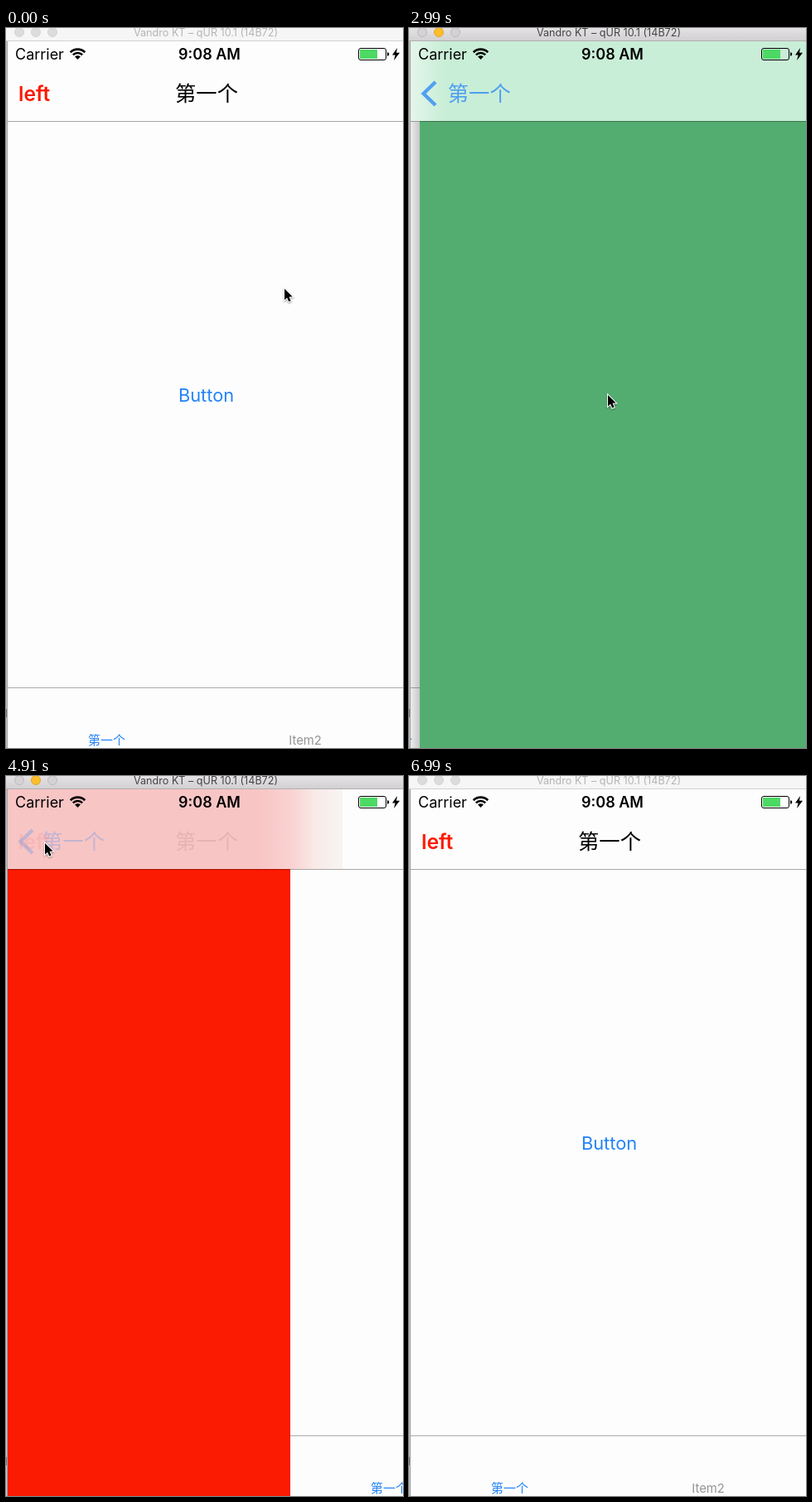
Recreate the animation shown at these times as an HTML page with a canvas. Size 479 by 867 pixels, loop 7.09 s.

```html
<!DOCTYPE html>
<html lang="zh">
<head>
<meta charset="utf-8">
<style>
html, body { margin: 0; width: 100%; height: 100%; overflow: hidden; background: #fdfdfd; }
canvas { display: block; }
</style>
</head>
<body>
<canvas id="stage" width="479" height="867"></canvas>
<script>
const c = document.getElementById('stage').getContext('2d');
const W = 479, H = 867, LEFT = 2, TOP = 16, NAV = 112, TAB = 794, SPAN = W - LEFT;
const LOOP = 7090;
const BLUE = '#2383f8', RED = '#fb1a02', GREEN = '#54ad70';
const LINE = 'rgba(0,0,0,.34)';
const NAME = '第一个';

// Start times of the four page changes
const PUSH_GREEN = 2691, POP_GREEN = 3735, PUSH_RED = 4815, POP_RED = 5698;

// Pointer path: time, x, y
const PATH = [
  [0, 336, 314], [300, 341, 305], [1802, 341, 305], [2540, 240, 442], [2990, 240, 442],
  [3600, 51, 78], [3890, 51, 78], [4170, 80, 97], [4330, 77, 95], [4620, 47, 81],
  [4920, 47, 81], [5660, 46, 82], [6100, 46, 82], [6550, 470, 190]
];

const lerp = (a, b, k) => a + (b - a) * k;
const settle = dt => {
  const p = dt < 0 ? 0 : 1 - Math.exp(-dt * 0.0127);
  return p > 0.998 ? 1 : p;
};
const fadeIn = dt => Math.max(0, Math.min(1, dt / 400));

function rect(x, y, w, h, fill) {
  c.fillStyle = fill;
  c.fillRect(x, y, w, h);
}

function text(str, x, y, size, fill, { weight = 400, align = 'left', alpha = 1 } = {}) {
  if (alpha <= 0) return;
  c.save();
  c.globalAlpha = alpha;
  c.font = `${weight} ${size}px Inter, "Noto Sans CJK SC", "Noto Sans CJK", sans-serif`;
  c.textAlign = align;
  c.fillStyle = fill;
  c.fillText(str, x, y);
  c.restore();
}

function poly(points, x = 0, y = 0) {
  c.beginPath();
  points.forEach(([px, py]) => c.lineTo(x + px, y + py));
}

function gradient(x0, y0, x1, y1, stops) {
  const g = c.createLinearGradient(x0, y0, x1, y1);
  stops.forEach(([at, color]) => g.addColorStop(at, color));
  return g;
}

function windowBar(active) {
  rect(0, 0, W, 15, active ? gradient(0, 0, 0, 15, [[0, '#e4e2e4'], [1, '#d2d0d2']]) : '#f6f6f6');
  rect(0, 15, W, 1, active ? '#b1afb1' : '#d3d3d3');
  [16, 36, 56].forEach((x, i) => {
    c.beginPath();
    c.arc(x, 5, 5.5, 0, 7);
    c.fillStyle = !active ? '#dcdcdc' : i === 1 ? '#fdbd2d' : '#d4d2d4';
    c.fill();
    c.lineWidth = 1;
    c.strokeStyle = !active ? '#d4d4d4' : i === 1 ? '#e5a62a' : '#bcbabc';
    c.stroke();
  });
  text('Vandro KT – qUR 10.1 (14B72)', 241, 10, 12.6, active ? '#454445' : '#b4b4b4', { align: 'center' });
  rect(0, TOP, 1, H, '#c4c4c4');
  rect(1, TOP, 1, H, '#a2a2a2');
  rect(0, 820, 1, 10, '#777');
}

function mainPage(dx, pressed) {
  const x = LEFT + dx;
  rect(x, TOP, SPAN, H, '#fdfdfd');
  text('Button', 241.5 + dx, 450, 21.8, BLUE, { align: 'center', alpha: pressed ? 0.22 : 1 });
  rect(x, TAB, SPAN, 1, '#ababab');
  text(NAME, 121.5 + dx, 863, 15, BLUE, { align: 'center' });
  text('Item2', 361 + dx, 863, 14.8, '#949494', { align: 'center' });
}

function chevron(alpha) {
  c.save();
  c.globalAlpha = alpha;
  c.strokeStyle = BLUE;
  c.lineWidth = 4.4;
  poly([[32, 65], [17.5, 79], [32, 93]]);
  c.stroke();
  c.restore();
}

function statusBar() {
  text('Carrier', 11, 38, 18, '#000');
  text('9:08 AM', 245.5, 38, 18, '#000', { weight: 600, align: 'center' });
  c.strokeStyle = c.fillStyle = '#000';
  const a = -Math.PI * 3 / 4, b = -Math.PI / 4;
  c.lineWidth = 2.6;
  [12.4, 8].forEach(r => {
    c.beginPath();
    c.arc(86.5, 38, r, a, b);
    c.stroke();
  });
  c.beginPath();
  c.moveTo(86.5, 38);
  c.arc(86.5, 38, 4.8, a, b);
  c.fill();

  c.lineWidth = 1;
  c.beginPath();
  c.roundRect(425.5, 24.5, 33, 14, 2.5);
  c.stroke();
  rect(427, 26, 21, 11, '#4cd964');
  c.fillStyle = '#000';
  c.beginPath();
  c.arc(460, 31.5, 2.2, -Math.PI / 2, Math.PI / 2);
  c.fill();
  poly([[472, 24], [466, 32.5], [469.6, 32.5], [468, 39], [475, 29.8], [471, 29.8]]);
  c.fill();
}

function pointer(x, y) {
  const shape = [[0, 0], [0, 13.6], [3.1, 10.8], [5.2, 15.6], [7.6, 14.6], [5.5, 9.8], [9.6, 9.6]];
  c.save();
  c.shadowColor = 'rgba(0,0,0,.4)';
  c.shadowBlur = 2;
  c.shadowOffsetY = 1;
  poly(shape, x, y);
  c.closePath();
  c.lineWidth = 2;
  c.strokeStyle = '#fff';
  c.stroke();
  c.restore();
  c.fillStyle = '#000';
  c.fill();
}

function pointerAt(t) {
  const i = PATH.findIndex(k => k[0] > t);
  if (i < 0) return null;
  const [t0, x0, y0] = PATH[i - 1], [t1, x1, y1] = PATH[i];
  const k = (t - t0) / (t1 - t0);
  return [Math.round(lerp(x0, x1, k)), Math.round(lerp(y0, y1, k))];
}

// Returns how far the second page covers the first, and the bar item opacities
function transition(t, push, pop) {
  const back = t >= pop;
  const start = back ? pop : push;
  const p = settle(t - start);
  const enter = fadeIn(t - start), leave = (1 - p) ** 2;
  return {
    cover: back ? 1 - p : p,
    home: back ? enter : leave,
    detail: back ? leave : enter,
    opening: !back && t >= push
  };
}

function greenScene(t) {
  const { cover, home, detail, opening } = transition(t, PUSH_GREEN, POP_GREEN);
  const edge = cover < 0.005 ? W : Math.round(W - SPAN * cover);
  mainPage(Math.floor(-143 * cover), t > 2600 && t < 3000);
  rect(LEFT, TOP, SPAN, H, `rgba(0,0,0,${0.08 * cover})`);
  const depth = opening ? 0.15 : 0.15 * cover;
  rect(edge - 10, NAV + 1, 10, H, gradient(edge - 10, 0, edge, 0, [[0, 'rgba(0,0,0,0)'], [1, `rgba(0,0,0,${depth})`]]));
  rect(edge, TOP, SPAN, H, GREEN);

  const tint = '#c9eed7';
  rect(LEFT, TOP, SPAN, NAV - TOP, edge === W ? '#fdfdfd' : cover > 0.99 ? tint
    : gradient(edge - 62, 0, edge + 30, 0, [[0, '#fdfdfd'], [0.4, '#edf8f0'], [1, tint]]));
  const pressed = t > 3650 && t < POP_GREEN ? 0.27 : 1;
  const x = lerp(242, 81, cover);
  text('left', 15, 88, 24.6, RED, { weight: 600, alpha: home });
  text(NAME, x, 88, 25.3, '#000', { weight: 500, align: 'center', alpha: home });
  text(NAME, x, 88, 25.3, BLUE, { align: 'center', alpha: detail * pressed });
  chevron(detail * pressed);
}

function redScene(t) {
  const { cover, home, detail } = transition(t, PUSH_RED, POP_RED);
  const dx = Math.round(SPAN * cover), edge = LEFT + dx;
  mainPage(dx, false);
  rect(LEFT, TOP, dx, H, RED);

  const tint = '#f8c5c5';
  rect(LEFT, TOP, SPAN, NAV - TOP, cover > 0.99 ? tint : '#fdfdfd');
  if (cover > 0.01 && cover <= 0.99) {
    rect(LEFT, TOP, edge + 63 - LEFT, NAV - TOP,
      gradient(edge - 38, 0, edge + 63, 0, [[0, tint], [0.4, '#f9d3d2'], [0.66, '#f9e9e7'], [1, '#f7f5f3']]));
  }
  const leftDown = t > 4700 && t < PUSH_RED ? 0.25 : 1;
  const backDown = t > 5600 && t < POP_RED ? 0.27 : 1;
  text('left', 15, 88, 24.6, RED, { weight: 600, alpha: home * leftDown });
  text(NAME, 242, 88, 25.3, '#000', { weight: 500, align: 'center', alpha: home });
  text(NAME, 81, 88, 25.3, BLUE, { align: 'center', alpha: detail * backDown });
  chevron(detail * backDown);
}

// The picture advances in steps of about 150 ms
const stepTime = t => t < 1943
  ? Math.floor(t / 150) * 150
  : 1950 + 148.2 * Math.floor((t - 1943) / 148.2);

function draw(now) {
  const t = stepTime(now % LOOP);
  c.clearRect(0, 0, W, H);
  windowBar(t >= 750 && t < 6980);
  c.save();
  c.beginPath();
  c.rect(LEFT, TOP, SPAN, H);
  c.clip();
  if (t < 4250) greenScene(t);
  else redScene(t);
  rect(LEFT, NAV, SPAN, 1, LINE);
  statusBar();
  const tip = pointerAt(t);
  if (tip && t < 6500) pointer(...tip);
  c.restore();
}

const begin = performance.now();
function tick() {
  draw(performance.now() - begin);
  requestAnimationFrame(tick);
}
tick();
</script>
</body>
</html>
```
